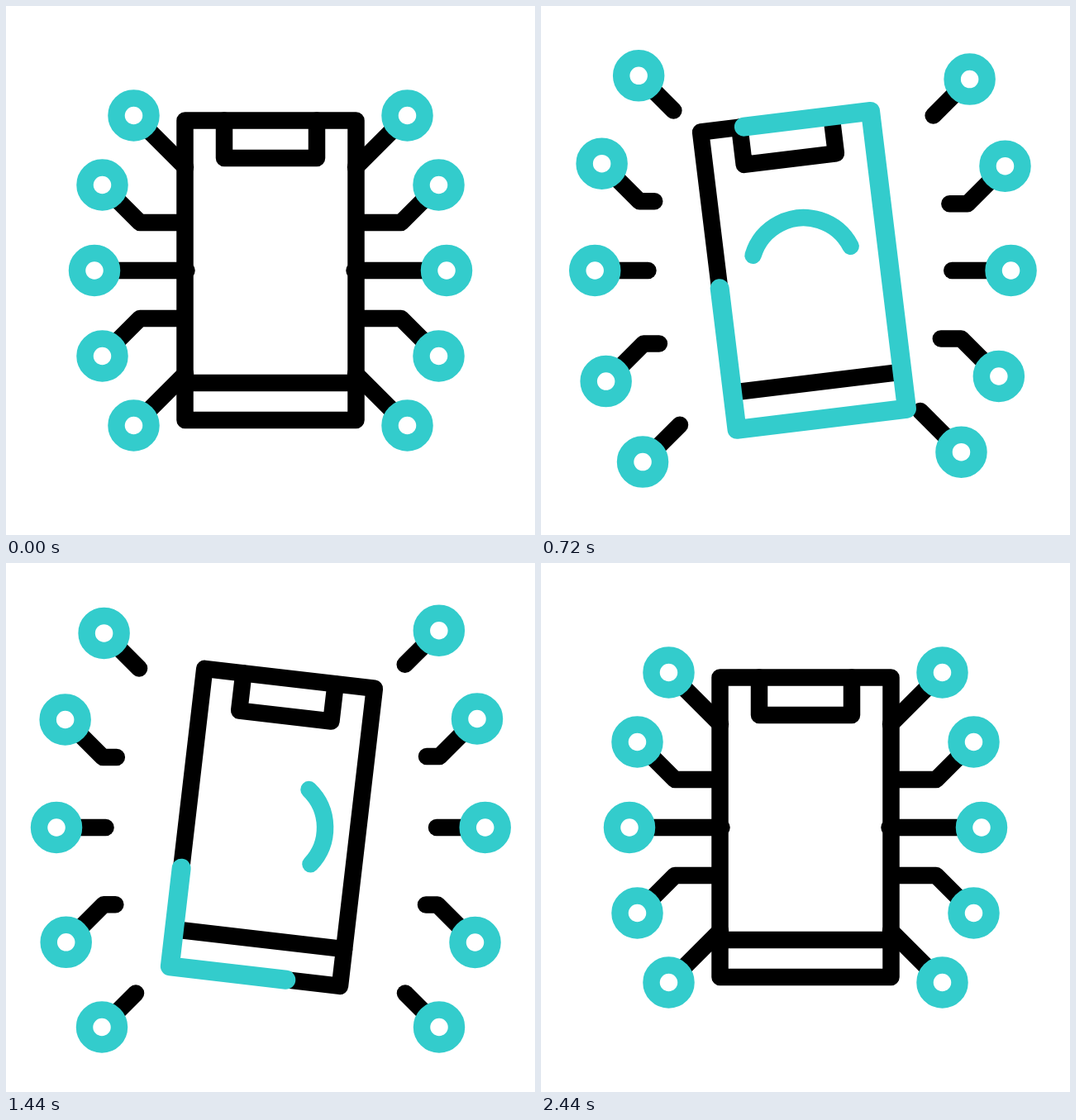
Animation, 640 px wide and 640 px high, one loop 2800 ms. Source, as an HTML page with a canvas:

```html
<!DOCTYPE html>
<html lang="en">
<head>
<meta charset="utf-8">
<title>Phone network</title>
<style>
html, body { margin: 0; width: 100%; height: 100%; overflow: hidden; background: #fff; }
canvas { display: block; width: 640px; height: 640px; }
</style>
</head>
<body>
<canvas id="stage" width="640" height="640"></canvas>
<script>
const ctx = document.getElementById('stage').getContext('2d');
const TEAL = '#33cccc', BLACK = '#000', LINE = 20.5, RAD = Math.PI / 180;
const LOOP = 2800, STEP = 40, STAGGER = 40;
const LEFT = 216.5, TOP = 138.5, RIGHT = 423.5, BOTTOM = 501;
const PERIMETER = 2 * (RIGHT - LEFT + BOTTOM - TOP);

// Left-hand nodes from top to bottom: rest position, travel and wire shape.
const NODES = [
  { x: 154.5, y: 132.5, dx: -38.5, dy: -51, diagonal: 1 },
  { x: 116.5, y: 216.5, dx: -46.5, dy: -28, bend: 45.5, end: 211, pull: 80 },
  { x: 107, y: 320, dx: -46.7, dy: 0, bend: 0, end: 218.5, pull: 99.5 },
  { x: 116.5, y: 423.5, dx: -44, dy: 35.5, bend: -45.5, end: 210, pull: 78 },
  { x: 154.5, y: 507.5, dx: -38.5, dy: 54, diagonal: -1 }
];

// Cubic Bezier easing (.55, 0, .2, 1), solved by bisection.
function ease(x) {
  if (x <= 0) return 0;
  if (x >= 1) return 1;
  let lo = 0, hi = 1, u;
  for (let i = 0; i < 24; i++) {
    u = (lo + hi) / 2;
    const v = 1 - u;
    if (1.65 * u * v * v + 0.6 * u * u * v + u * u * u < x) lo = u; else hi = u;
  }
  return u * u * (3 - 2 * u);
}

// Sum of eased moves, each [amount, start, duration].
const move = (t, ...moves) =>
  moves.reduce((sum, [amount, start, duration]) => sum + amount * ease((t - start) / duration), 0);

function stroke(points, color = BLACK, width = LINE, close = false) {
  ctx.beginPath();
  points.forEach(([x, y]) => ctx.lineTo(x, y));
  if (close) ctx.closePath();
  ctx.strokeStyle = color;
  ctx.lineWidth = width;
  ctx.stroke();
}

function drawNode(node, t) {
  const f = move(t, [1, 0, 1000], [-1, 1268, 851]);
  const x = node.x + node.dx * f, y = node.y + node.dy * f;
  if (node.diagonal) {
    const reach = 62.5 - 21.5 * f;
    stroke([[x, y], [x + reach, y + reach * node.diagonal]]);
  } else {
    const elbow = y + node.bend;
    stroke([[x, y], [x + Math.abs(node.bend), elbow], [node.end - node.pull * f, elbow]]);
  }
  ctx.beginPath();
  ctx.arc(x, y, 21, 0, 2 * Math.PI);
  ctx.fillStyle = '#fff';
  ctx.fill();
  ctx.strokeStyle = TEAL;
  ctx.stroke();
}

// Teal line that runs down the left edge and around the phone.
function drawEdgeTrace(t, outline) {
  const offset = 9 + move(t, [330, 872, 656], [-476, 1300, 1010]);
  const tail = offset + move(t, [PERIMETER, 708, 1391]);
  const length = offset + move(t, [PERIMETER, 116, 1125]) - tail;
  if (length < 0.5) return;
  ctx.setLineDash([length, PERIMETER - length]);
  ctx.lineDashOffset = -tail;
  stroke(outline, TEAL, 23, true);
  ctx.setLineDash([]);
}

// Teal ring on the screen, drawn and erased counter-clockwise.
function drawRing(t) {
  const offset = 44 + move(t, [-43, 480, 560], [57, 1040, 400], [-168, 1300, 1010]);
  const tail = offset + move(t, [360, 655, 1532]);
  const head = offset + move(t, [360, 257, 1258]);
  if (head - tail < 0.2) return;
  ctx.beginPath();
  ctx.arc(320, 320, 64, -tail * RAD, -head * RAD, true);
  ctx.strokeStyle = TEAL;
  ctx.lineWidth = LINE;
  ctx.stroke();
}

function drawPhone(t) {
  const pivotY = 338;
  ctx.save();
  ctx.translate(320, pivotY);
  ctx.rotate(move(t, [-7, 0, 800], [14, 800, 800], [-7, 1600, 800]) * RAD);
  ctx.translate(-320, -pivotY);
  const outline = [[LEFT, 320], [LEFT, BOTTOM], [RIGHT, BOTTOM], [RIGHT, TOP], [LEFT, TOP]];
  stroke(outline, BLACK, LINE, true);
  stroke([[264, TOP], [264, 184], [376, 184], [376, TOP]]);
  stroke([[LEFT, 456], [RIGHT, 456]]);
  drawEdgeTrace(t, outline);
  drawRing(t);
  ctx.restore();
}

function draw(now) {
  const t = Math.floor(now % LOOP / STEP) * STEP;
  ctx.fillStyle = '#fff';
  ctx.fillRect(0, 0, 640, 640);
  ctx.lineCap = ctx.lineJoin = 'round';
  NODES.forEach((node, i) => drawNode(node, t - i * STAGGER));
  ctx.save();
  ctx.translate(640, 0);
  ctx.scale(-1, 1);
  NODES.forEach((node, i) => drawNode(node, t - (i + 3) * STAGGER));
  ctx.restore();
  drawPhone(t);
}

const start = performance.now();
function tick() {
  draw(performance.now() - start);
  requestAnimationFrame(tick);
}
tick();
</script>
</body>
</html>
```
